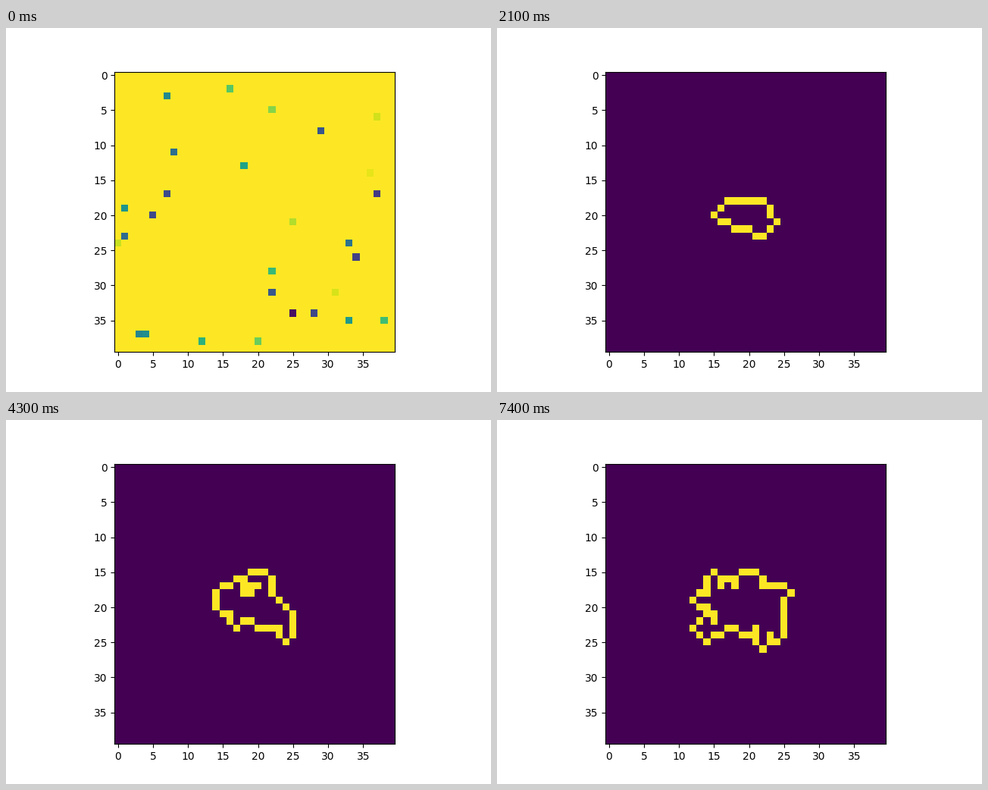
These frames come from a looping animation (640x480 px, 7.5 s). A matplotlib script:

```python
import math
import numpy as np
import matplotlib.pyplot as plt
from matplotlib.animation import FuncAnimation

SIZE = 40
FRAMES = 75
SPECKS = 28
PACE = 5  # steps between two cells of a branch
SEED = (20, 20)

# Branches of the cluster: first step, then the corners (column, row)
BRANCHES = [
    (1, [SEED, (15, 20)]),
    (4, [(20, 21), (24, 21)]),
    (11, [(20, 19), (21, 19), (21, 16), (19, 16)]),
    (11, [(21, 22), (24, 22), (24, 24)]),
    (16, [(17, 19), (17, 17)]),
    (28, [(19, 21), (17, 21), (17, 22), (16, 22), (16, 23), (13, 23)]),
    (34, [(16, 19), (13, 19)]),
    (36, [(16, 18), (15, 18), (15, 16)]),
    (41, [(22, 19), (24, 19), (24, 18), (25, 18)]),
    (50, [(23, 23), (22, 23), (22, 25)]),
    (64, [(14, 24), (14, 22)]),
]


def walk(corners):
    """Cells along a path of straight runs."""
    col, row = corners[0]
    yield col, row
    for end in corners[1:]:
        while (col, row) != end:
            col += np.sign(end[0] - col)
            row += np.sign(end[1] - row)
            yield int(col), int(row)


def neighbours(cell):
    col, row = cell
    return {(col - 1, row), (col + 1, row), (col, row - 1), (col, row + 1)}


def perimeter(cells):
    """Empty sites that touch the cluster."""
    return set().union(*map(neighbours, cells)) - set(cells)


def spread(cell):
    """Distance from the seed; the cluster is wider than tall."""
    return math.hypot(0.7 * (cell[0] - SEED[0]), cell[1] - SEED[1])


def grow():
    """One cell per step: branches lead, gaps close from the centre out."""
    plan = sorted((start + PACE * i, cell)
                  for start, corners in BRANCHES
                  for i, cell in enumerate(walk(corners)))
    cells = [SEED]
    for step in range(2, FRAMES):
        rim = perimeter(cells)
        due = [cell for when, cell in plan if when <= step and cell in rim]
        cells.append(due[0] if due else min(sorted(rim), key=spread))
    return cells


def noise():
    rng = np.random.default_rng(4)
    grid = np.ones(SIZE * SIZE)
    spots = rng.choice(grid.size, SPECKS, replace=False)
    grid[spots] = rng.random(SPECKS)
    return grid.reshape(SIZE, SIZE)


def outline(cells):
    grid = np.zeros((SIZE, SIZE))
    for col, row in perimeter(cells):
        grid[row, col] = 1
    return grid


cluster = grow()
fig, ax = plt.subplots(figsize=(6.4, 4.8), dpi=100)
image = ax.imshow(noise(), cmap="viridis", vmin=0, vmax=1)


def update(step):
    image.set_data(outline(cluster[:step]) if step else noise())
    return [image]


anim = FuncAnimation(fig, update, frames=FRAMES, interval=100,
                     repeat=True, repeat_delay=0)
plt.show()
```
